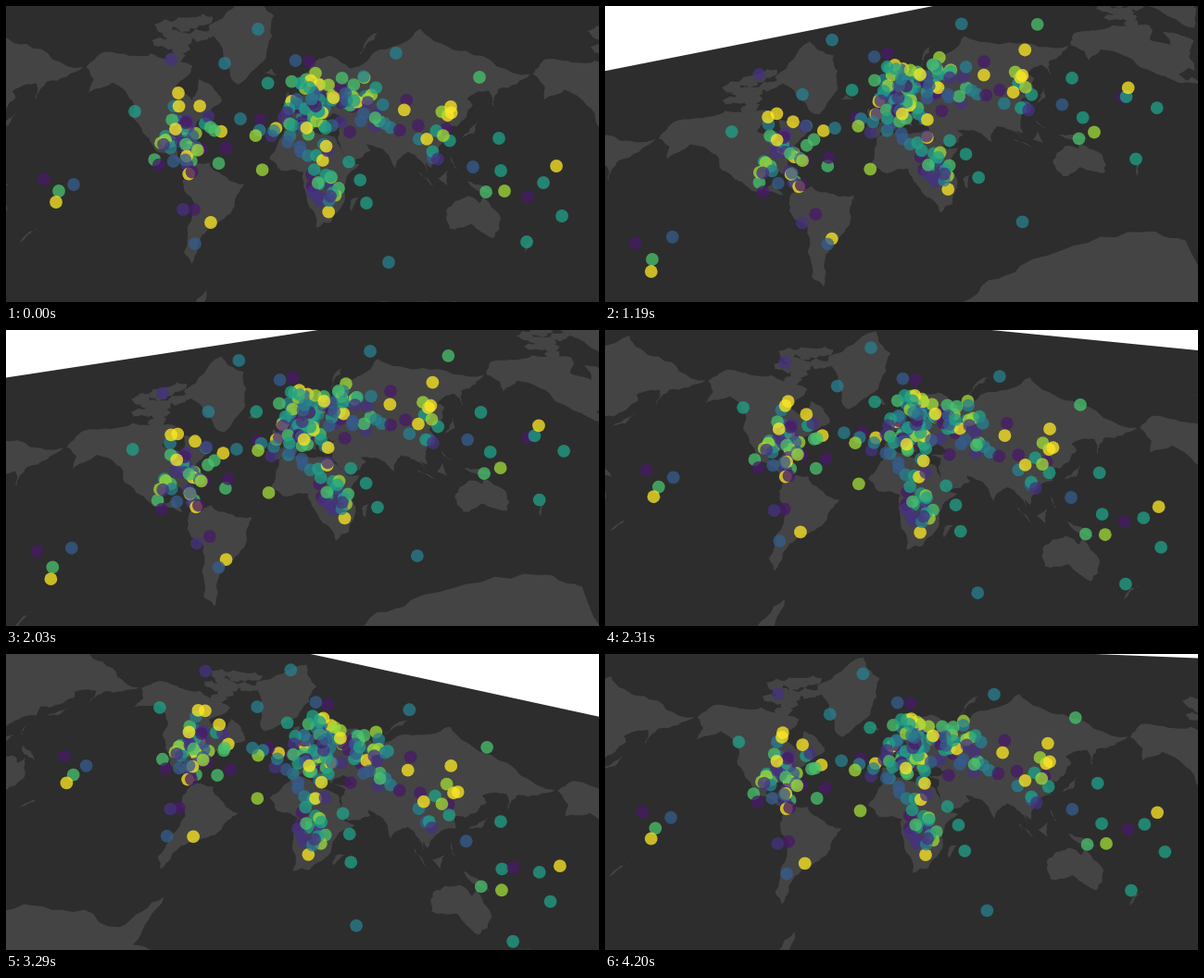
An HTML page with a canvas for the animation above (4.27 s loop, 640 px wide and 320 px high).

```html
<!DOCTYPE html>
<html lang="en">
<head>
<meta charset="utf-8">
<title>Tilting dot map</title>
<style>
html, body { margin: 0; width: 100%; height: 100%; overflow: hidden; background: #2d2d2d; }
canvas { display: block; width: 640px; height: 320px; }
</style>
</head>
<body>
<canvas id="map" width="640" height="320"></canvas>
<script>
const ctx = document.getElementById('map').getContext('2d');
const LOOP = 4270, STEP = 70, RAD = Math.PI / 180;
const WORLD = 512, EYE = 480, CENTER_LON = 8, EQUATOR = 26;
const WATER = '#2d2d2d', LAND = '#444';
const VIRIDIS = ['#471a66', '#46327e', '#365c8d', '#277f8e', '#1fa187', '#4ac16d', '#a0da39', '#fde725'];

let seed = 11;
function rand() {
  seed = (seed + 0x6d2b79f5) | 0;
  let n = Math.imul(seed ^ (seed >>> 15), 1 | seed);
  n = (n + Math.imul(n ^ (n >>> 7), 61 | n)) ^ n;
  return ((n ^ (n >>> 14)) >>> 0) / 4294967296;
}
const between = (a, b) => a + (b - a) * rand();
const bell = () => (rand() + rand() + rand() - 1.5) * 2;
const clamp = (v, a, b) => Math.min(b, Math.max(a, v));

// Camera: time, bearing and pitch in degrees
const keys = [
  [0, 1, 17], [350, 0.4, 35], [1190, -17.3, 35], [1750, -31, 38],
  [2310, 7.7, 27], [3290, 18, 32], [4200, 3.2, 27]
];
const rate = (i, j) => (keys[i + 1][j] - keys[i][j]) / (keys[i + 1][0] - keys[i][0]);
function slope(i, j) {
  if (i === 0) return rate(0, j);
  if (i === keys.length - 1) return rate(i - 1, j);
  const a = rate(i - 1, j), b = rate(i, j);
  return a * b > 0 ? 2 * a * b / (a + b) : 0;
}
// Monotone cubic through the keys
function pose(t) {
  let i = 0;
  while (i < keys.length - 2 && t >= keys[i + 1][0]) i++;
  const a = keys[i], b = keys[i + 1], d = b[0] - a[0];
  const s = Math.min(1, (t - a[0]) / d), s2 = s * s, s3 = s2 * s;
  return a.map((v, j) => v * (2 * s3 - 3 * s2 + 1) + b[j] * (3 * s2 - 2 * s3) +
    d * (slope(i, j) * (s3 - 2 * s2 + s) + slope(i + 1, j) * (s3 - s2)));
}

function camera([, bearing, pitch]) {
  const cb = Math.cos(bearing * RAD), sb = Math.sin(bearing * RAD);
  const cp = Math.cos(pitch * RAD), sp = Math.sin(pitch * RAD);
  return {
    project(x, y, z = 0) {
      const u = x * cb - y * sb, v = x * sb + y * cb;
      const k = EYE / Math.max(50, EYE - v * sp - z * cp);
      return [320 + u * k, 160 + (v * cp - z * sp) * k];
    },
    // Map position of a screen point at height z
    unproject(sx, sy, z) {
      const dx = sx - 320, dy = sy - 160;
      const v = (dy * (EYE - cp * z) + EYE * sp * z) / (EYE * cp + sp * dy);
      const u = dx * (EYE - v * sp - z * cp) / EYE;
      return [u * cb + v * sb, v * cb - u * sb];
    }
  };
}

function mercator(lon, lat) {
  const k = WORLD / 360;
  return [(lon - CENTER_LON) * k, EQUATOR - k / RAD * Math.log(Math.tan((45 + lat / 2) * RAD))];
}

// Splits each edge at a jittered midpoint to make a ragged coast
function roughen(pts, depth) {
  if (!depth) return pts;
  const out = [];
  pts.forEach(([x, y], i) => {
    const [nx, ny] = pts[(i + 1) % pts.length];
    const j = between(-0.13, 0.13);
    out.push([x, y], [(x + nx) / 2 + (ny - y) * j, (y + ny) / 2 - (nx - x) * j]);
  });
  return roughen(out, depth - 1);
}

// Coarse coastlines as lon, lat pairs
const outlines = [
  // North and South America
  [-168,66,-156,71,-128,70,-95,69,-82,67,-94,59,-80,52,-76,62,-65,59,-56,52,-66,46,-75,38,-81,26,-84,30,-97,27,-96,19,
   -88,21,-83,9,-104,19,-113,30,-124,41,-125,49,-145,60,-163,55,-160,61],
  [-78,8,-62,10,-50,0,-35,-6,-41,-22,-58,-36,-66,-45,-69,-54,-75,-49,-71,-20,-81,-5],
  // Africa
  [-6,36,10,36,32,31,43,12,51,11,40,-4,40,-15,30,-31,19,-35,12,-17,9,4,-8,5,-17,14],
  // Eurasia
  [-9,37,-9,43,-1,44,2,51,9,57,24,60,14,56,5,60,14,68,28,71,45,67,70,73,104,78,140,73,190,66,163,60,157,51,155,59,
   137,55,141,52,127,39,119,38,122,30,108,20,105,9,101,13,103,2,95,16,88,21,78,8,70,22,57,26,60,22,45,13,35,29,36,37,
   27,38,41,42,31,46,24,38,13,45,17,39,3,43,-3,37],
  // Greenland, Australia, Antarctica
  [-72,78,-35,83.5,-18,80,-23,70,-44,60,-54,68],
  [114,-22,130,-12,139,-17,142,-11,153,-27,146,-39,131,-31,115,-34],
  [-180,-85,-178,-78,-130,-74,-75,-73,-57,-63,-61,-75,-30,-77,10,-70,55,-66,135,-66,168,-72,180,-85],
  // Islands
  [-5,50,1,52,-4,58], [-24,65,-18,66.5,-14,64], [44,-24,44,-17,50,-14], [130,32,140,35,145,44,140,40],
  [167,-46,172,-40,178,-38], [131,-1,150,-10,138,-8], [109,1,117,7,116,-4], [95,6,106,-6,103,-1], [120,18,126,7,122,10],
  [52,71,69,77,58,74]
];
const land = outlines.map(list => {
  const pts = [];
  for (let i = 0; i < list.length; i += 2) pts.push(mercator(list[i], list[i + 1]));
  return roughen(pts, 3);
});
// Arctic archipelago
for (let i = 0; i < 18; i++) {
  const [x, y] = mercator(between(-120, -68), between(68, 80));
  const r = between(4, 10), turn = rand() * 6;
  const ring = [0, 1, 2, 3, 4].map(a => [x + r * 1.4 * Math.cos(a * 1.257 + turn), y + r * Math.sin(a * 1.257 + turn)]);
  land.push(roughen(ring, 2));
}

// Dots are placed as seen in the opening view
const opening = camera(pose(0));
const dots = [];
function addDot(x, y, color, z) {
  const [mx, my] = opening.unproject(x, y, z);
  dots.push({ x: mx, y: my, z, color: VIRIDIS[color] });
}
// Northern dots float higher
function addCluster(n, x, y, sx, sy) {
  for (let i = 0; i < n; i++) {
    const py = y + bell() * sy;
    addDot(x + bell() * sx, py, Math.floor(rand() * 8), between(0.4, 1) * clamp(170 - 0.7 * py, 20, 100));
  }
}
addCluster(46, 193, 146, 19, 18);
addCluster(62, 345, 106, 27, 14);
addCluster(16, 328, 82, 13, 16);
addCluster(18, 304, 142, 18, 14);
addCluster(26, 352, 182, 16, 20);
addCluster(12, 420, 118, 18, 18);
addCluster(12, 470, 145, 18, 16);

// Lone dots: x, y, colour, height
[
  [41,187,0,24], [73,193,2,28], [57,200,5,0], [54,212,7,0],
  [178,58,1,102], [272,25,3,90], [236,62,3,24], [139,114,4,82], [186,94,7,56], [253,122,3,40],
  [203,220,0,47], [191,220,1,35], [221,234,7,3], [204,257,2,50], [389,213,4,0], [413,277,3,0],
  [421,51,3,104], [511,77,5,103], [480,109,7,100], [504,174,2,55], [532,143,4,57],
  [518,201,5,0], [538,200,6,4], [534,178,4,5], [563,206,0,95], [580,191,4,65],
  [600,227,4,85], [594,173,7,50], [562,255,4,25]
].forEach(d => addDot(...d));

function draw(t) {
  const { project } = camera(pose(t));
  ctx.fillStyle = WATER;
  ctx.fillRect(0, 0, 640, 320);

  ctx.fillStyle = LAND;
  for (const pts of land) {
    for (const shift of [-WORLD, 0, WORLD]) {
      ctx.beginPath();
      for (const [x, y] of pts) ctx.lineTo(...project(x + shift, y));
      ctx.fill();
    }
  }

  // Beyond the northern edge of the map
  const edge = EQUATOR - WORLD / 2;
  ctx.fillStyle = '#fff';
  ctx.beginPath();
  ctx.moveTo(...project(-900, edge));
  ctx.lineTo(...project(900, edge));
  ctx.lineTo(2000, -2000);
  ctx.lineTo(-2000, -2000);
  ctx.fill();

  ctx.globalAlpha = 0.76;
  for (const d of dots) {
    const [x, y] = project(d.x, d.y, d.z);
    ctx.fillStyle = d.color;
    ctx.beginPath();
    ctx.arc(x, y, 6.9, 0, 7);
    ctx.fill();
  }
  ctx.globalAlpha = 1;
}

const start = performance.now();
function tick() {
  const t = (performance.now() - start) % LOOP;
  draw(Math.floor(t / STEP) * STEP);
  requestAnimationFrame(tick);
}
tick();
</script>
</body>
</html>
```
